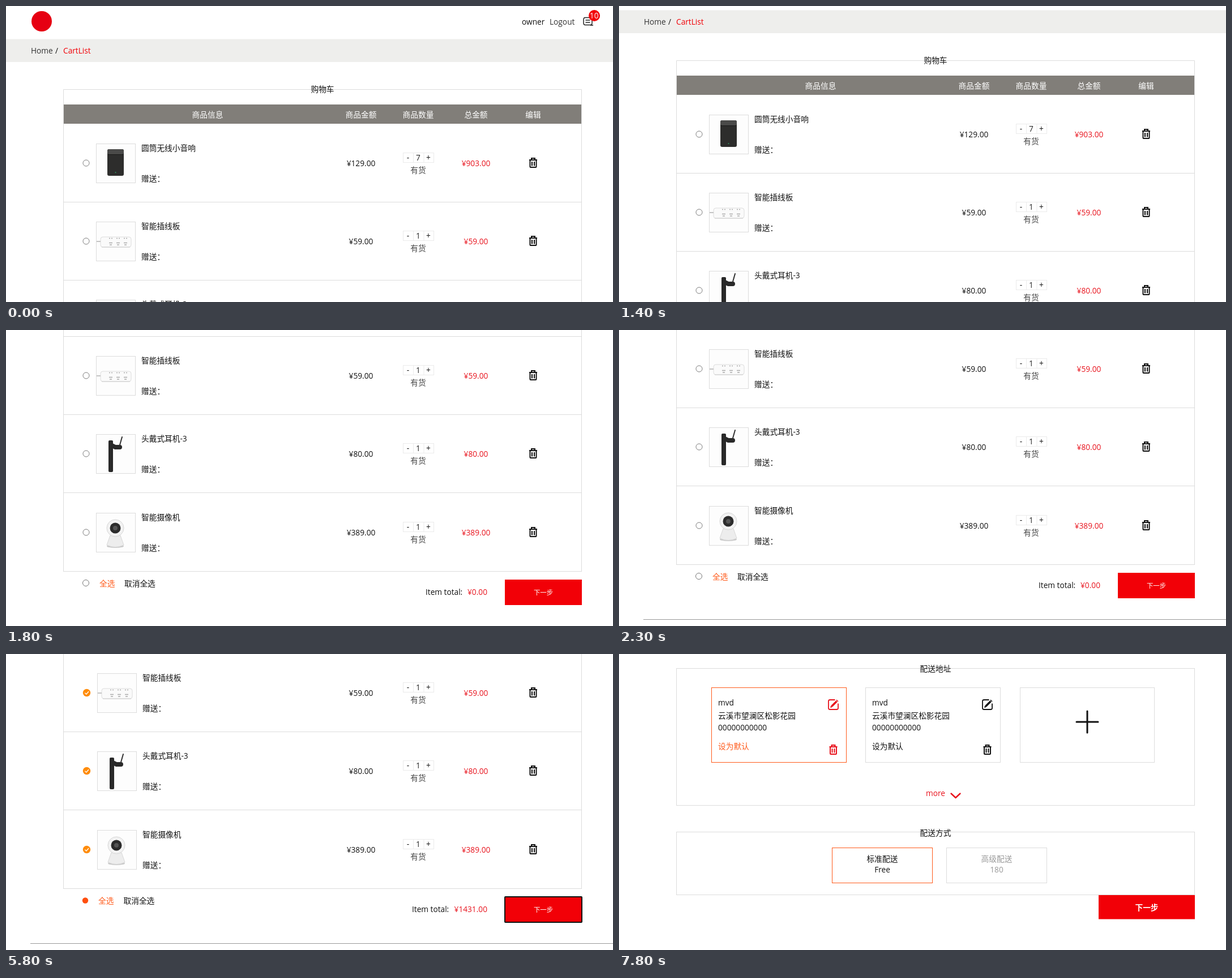
Write an HTML page that moves like this. It is 1072 px wide and 523 px high and loops after 8000 ms.

```html
<!DOCTYPE html>
<html lang="zh-CN">
<head>
<meta charset="utf-8">
<title>Cart</title>
<style>
html, body { margin: 0; width: 100%; height: 100%; overflow: hidden; background: #fff; }
svg { display: block; font: 13.7px "Open Sans", "Noto Sans CJK SC", "Noto Sans CJK", sans-serif; }
</style>
</head>
<body>
<svg id="stage" width="1072" height="523" viewBox="0 0 1072 523"></svg>
<script>
const RED = '#f20007', PRICE = '#e8121c', ORANGE = '#ff5a1a', LINE = '#dcdcdc', INK = '#111', GREY = '#999';

const text = (x, y, s, fill = INK, anchor = 'start', extra = '') =>
  `<text x="${x}" y="${y}" fill="${fill}" text-anchor="${anchor}" ${extra}>${s}</text>`;
const mid = (x, y, s, fill, extra) => text(x, y, s, fill, 'middle', extra);
const rect = (x, y, w, h, fill, extra = '') =>
  `<rect x="${x}" y="${y}" width="${w}" height="${h}" fill="${fill}" ${extra}/>`;
const box = (x, y, w, h, color = LINE) => rect(x, y, w, h, 'none', `stroke="${color}"`);
const path = (d, color, width = 1, extra = '') =>
  `<path d="${d}" fill="none" stroke="${color}" stroke-width="${width}" ${extra}/>`;
const disc = (x, y, r, fill, extra = '') => `<circle cx="${x}" cy="${y}" r="${r}" fill="${fill}" ${extra}/>`;
const group = (inner, x = 0, y = 0, attrs = '') => `<g transform="translate(${x} ${y})" ${attrs}>${inner}</g>`;
const radio = (x, y) => disc(x, y, 5.5, '#fff', 'stroke="#777"');

const trash = (x, y, color = INK) => group(
  path('M-7 -5H7M-3 -5.5V-8H3V-5.5', color, 2) +
  path('M-5.5 -4V7Q-5.5 8 -4.5 8H4.5Q5.5 8 5.5 7V-4M-2 -2V5.5M2 -2V5.5', color, 2), x, y);

const pencil = (x, y, color) => group(
  path('M3 -8.5H-6Q-8.5 -8.5 -8.5 -6V6Q-8.5 8.5 -6 8.5H6Q8.5 8.5 8.5 6V-2', color, 1.8) +
  path('M-3 3L6 -6', color, 3.6) + `<path d="M-5.5 5.5L-4.4 1.8L-1.8 4.4Z M6 -9L9 -6L8 -5L5 -8Z" fill="${color}"/>`, x, y);

// Product pictures, in a 69 px square
const sockets = [26, 39, 52].map(x =>
  path(`M${x - 3} 29.5h2m2 0h2m-6 8h6m-5 3.5h4`, '#aaa', 1.4)).join('');
const pictures = [
  rect(20, 10, 29, 47, '#2d2d2c', 'rx="3"') + rect(20, 10, 29, 9, '#4a4a49', 'rx="3"') +
    path('M21 19.5H48', '#191919') + disc(34.5, 51, 1, '#2f9a60'),
  rect(8, 27, 54, 18, '#fafafa', 'rx="4" stroke="#ddd"') + path('M1 35H8', '#c4c4c4', 2) +
    path('M10 45H60', '#ccc') + sockets,
  rect(22, 11, 8, 56, '#292929', 'rx="2"') + path('M28 20L34 23H42', '#292929', 8, 'stroke-linecap="round"') +
    path('M42 19L46 5', '#333', 2, 'stroke-linecap="round"'),
  `<ellipse cx="34" cy="59" rx="15" ry="3" fill="#c9c9c9"/>` +
    `<path d="M25 40H43L49 57Q34 64 19 57Z" fill="#ededed" stroke="#d8d8d8"/>` +
    disc(34, 27, 15, '#f3f3f3', 'stroke="#d5d5d5"') + disc(34, 27, 9.5, '#2c2c2c') + disc(34, 27, 4, '#555')
];

const items = [
  ['圆筒无线小音响', 129, 7],
  ['智能插线板', 59, 1],
  ['头戴式耳机-3', 80, 1],
  ['智能摄像机', 389, 1]
];
const yuan = n => '¥' + n.toFixed(2);
const rowTop = [0, 138, 276, 415];

function itemRow([name, price, count], i) {
  const goods = rect(159.5, 243.5, 69, 69, '#fdfdfd', `stroke="${LINE}"`) + group(pictures[i], 159, 243) +
    text(239, 256, name) + text(239, 310, '赠送：');
  const tick = disc(142.5, 277.5, 6.7, '#ff8c0a') + path('M139.3 277.6L141.8 280L146 275.2', '#fff', 1.3);
  const counter = box(701.5, 259.5, 54, 17, '#ebebeb') + path('M719.5 259V277M738 259V277', '#ebebeb') +
    mid(710, 273, '-') + mid(728, 273, count, '#222') + mid(746, 273, '+');
  return group(
    `<g class="off">${radio(141.5, 277.5)}</g><g class="on">${tick}</g><g class="goods">${goods}</g>` +
    mid(627, 282.5, yuan(price)) + counter + mid(728, 294.5, '有货', '#444') +
    mid(830, 282.5, yuan(price * count), PRICE) + trash(931, 277) +
    path('M102 346.5H1016', LINE), 0, rowTop[i]);
}

const header =
  disc(63, 27, 18, '#e60012') +
  text(911, 33, 'owner') + text(960, 33, 'Logout', '#333') +
  path('M1023 20.5H1032Q1035 20.5 1035 24V30Q1035 33.5 1032 33.5H1023Q1020 33.5 1020 30V24Q1020 20.5 1023 20.5Z' +
    'M1023.5 25H1031.5M1023.5 29H1031.5M1032 34H1037', '#222', 1.5) +
  disc(1039, 17, 10, RED) + mid(1038.7, 22, '10', '#fff') +
  rect(0, 58.5, 1072, 40.5, '#eeeeec') +
  text(44, 84, 'Home', '#333') + text(87, 84, '/') + text(101, 84, 'CartList', RED);

const headings = [[356, '商品信息'], [627, '商品金额'], [728, '商品数量'], [830, '总金额'], [931, '编辑']];
const total = items.reduce((sum, [, price, count]) => sum + price * count, 0);
const sumLine = (x, n) => text(x, 803, 'Item total:') + text(850, 803, yuan(n), PRICE, 'end');

const cart = header +
  path('M101.5 762V147.5H1016.5V762', LINE) + mid(559, 152, '购物车') +
  rect(102, 174, 914, 34, '#817e79') +
  headings.map(([x, s]) => mid(x, 196.5, s, '#fff')).join('') +
  items.map(itemRow).join('') +
  `<g class="off">${radio(141, 782) + text(165, 788, '全选', ORANGE) + text(209, 788, '取消全选') + sumLine(741, 0)}</g>` +
  `<g class="on">${disc(140, 782.5, 5.2, '#ff4f0f') + text(163, 788, '全选', ORANGE) +
    text(207.5, 788, '取消全选') + sumLine(717, total)}</g>` +
  rect(881, 776, 136, 45, RED) +
  `<g id="focus">${rect(881, 776, 136, 45, 'none', 'stroke="#101010" stroke-width="2" rx="1"')}</g>` +
  mid(949, 803, '下一步', '#fff', 'font-size="11.4"') +
  path('M43 858.5H1072', GREY);

const card = (x, accent, border, label) => group(
  box(163.5, 25.5, 238, 132, border) +
  text(175, 57, 'mvd') + text(175, 79.5, '云溪市望澜区松影花园') + text(175, 101, '00000000000') +
  text(175, 134, '设为默认', label) + pencil(378.5, 55.5, accent) + trash(378.5, 135, accent), x);
const addCard = x => group(
  box(708.5, 25.5, 237, 132) + path('M808 86H846M827 67V105', INK, 3, 'stroke-linecap="round"'), x);

const shipping = (x, name, cost, color, border) =>
  box(x - 88.5, 308.5, 177, 62, border) + mid(x, 333, name, color) + mid(x, 351.5, cost, color);

const footer = path('M43 489.5H1072', GREY) +
  text(44, 529, 'Region', '#888') + rect(93.5, 517.5, 49, 18, '#fff', 'stroke="#888"') +
  text(97, 528, 'USA', INK, 'start', 'font-size="11.4"') +
  text(448, 529, 'Copyright © 2017 Qulvo All Rights Reserved.', '#888') +
  text(765, 529, 'About us', '#888') + text(847, 529, 'Terms Conditions', '#888') +
  text(986, 529, 'Privacy Policy', '#888');

const address =
  box(101.5, -8.5, 915, 242) + mid(559, -3, '配送地址') +
  `<g id="loading">${addCard(-545)}</g>` +
  `<g id="loaded">${card(0, PRICE, ORANGE, ORANGE) + card(272, INK, LINE, INK) + addCard(0)}</g>` +
  text(542, 217, 'more', PRICE) +
  path('M586.5 212.5L594.5 220L602.5 212.5', PRICE, 2.4, 'stroke-linecap="round" stroke-linejoin="round"') +
  box(101.5, 280.5, 915, 111) + mid(559, 286.5, '配送方式') +
  shipping(465, '标准配送', 'Free', INK, ORANGE) + shipping(667, '高级配送', '180', GREY, LINE) +
  rect(847, 392, 170, 42.5, RED) + mid(932, 418.5, '下一步', '#fff', 'font-weight="700"') +
  footer;

const stage = document.getElementById('stage');
stage.innerHTML = rect(0, 0, 1072, 523, '#fff') + `<g id="cart">${cart}</g><g id="address">${address}</g>`;

const all = selector => [...stage.querySelectorAll(selector)];
const show = (selector, visible) => all(selector).forEach(el => el.style.display = visible ? '' : 'none');
const moveTo = (selector, x, y) => all(selector).forEach(el => el.setAttribute('transform', `translate(${x} ${y})`));
const stepAt = (steps, t) => steps.reduce((value, [start, v]) => t >= start ? v : value, 0);

const cartScroll = [[0, 0], [1300, 10], [1400, 51], [1600, 95], [1700, 277], [1800, 335], [2300, 347]];
const addressShift = [[0, 0], [7700, 9], [7800, 34]];

function render(t) {
  const selected = t >= 4500, shippingPage = t >= 6300;
  show('#cart', !shippingPage);
  show('#address', shippingPage);
  moveTo('#cart', 0, -stepAt(cartScroll, t));
  moveTo('#address', 0, stepAt(addressShift, t));
  show('.on', selected);
  show('.off', !selected);
  moveTo('.goods', selected ? 2 : 0, 0);
  show('#focus', t >= 5800);
  show('#loading', t < 6500);
  show('#loaded', t >= 6500);
}

const start = performance.now();
function tick() {
  render((performance.now() - start) % 8000);
  requestAnimationFrame(tick);
}
tick();
</script>
</body>
</html>
```
